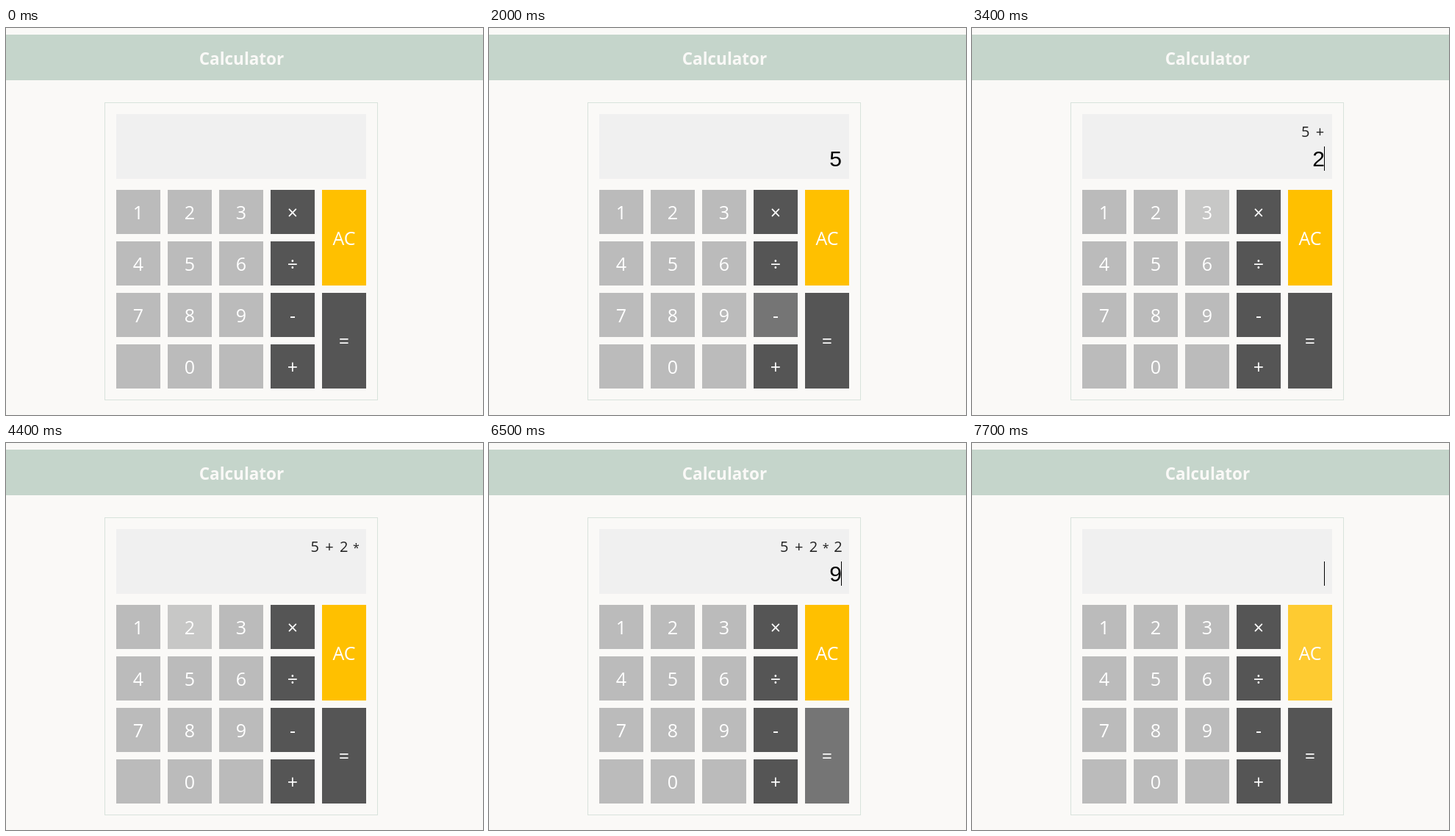
Recreate the animation shown at these times as an HTML page. Size 649x526 px, loop 8000 ms.

```html
<!DOCTYPE html>
<html lang="en">
<head>
<meta charset="utf-8">
<title>Calculator</title>
<style>
  html, body { margin: 0; width: 100%; height: 100%; overflow: hidden; background: #faf9f7; }
  svg { display: block; }
  text { font-family: "Open Sans", "Noto Sans", sans-serif; white-space: pre; }
  .title { font-size: 22.5px; font-weight: 700; fill: #faf9f7; text-anchor: middle; }
  .key text { font-size: 25px; fill: #fff; text-anchor: middle; }
  .expr text { font-size: 20px; fill: #222; text-anchor: middle; }
  .entry { font-family: "Liberation Sans", Arial, sans-serif; font-size: 30px; fill: #000; text-anchor: end; }
</style>
</head>
<body>
<svg width="649" height="526" viewBox="0 0 649 526">
  <rect width="649" height="526" fill="#faf9f7"/>
  <rect y="9" width="649" height="62" fill="#c5d5cb"/>
  <text class="title" x="320.5" y="50">Calculator</text>
  <rect x="134.5" y="101.5" width="371" height="404" fill="none" stroke="#d8e3dc"/>
  <rect x="150" y="117" width="340" height="88" fill="#f0f0f0"/>
  <g class="expr" id="expr"></g>
  <text class="entry" id="entry" x="480" y="188"></text>
  <rect id="caret" x="479" y="161" width="1" height="33"/>
  <g id="pad"></g>
</svg>
<script>
const LOOP = 8000;
const $ = id => document.getElementById(id);

function add(parent, tag, attrs, text = '') {
  const el = document.createElementNS('http://www.w3.org/2000/svg', tag);
  for (const name in attrs) el.setAttribute(name, attrs[name]);
  el.textContent = text;
  return parent.appendChild(el);
}

const keys = {};
function addKey(label, col, row, fill, rows = 1) {
  const x = 150 + col * 70, y = 220 + row * 70, h = rows * 70 - 10;
  const g = add($('pad'), 'g', { class: 'key' });
  add(g, 'rect', { x, y, width: 60, height: h, fill });
  add(g, 'text', { x: x + 30, y: y + h / 2 + 10 }, label);
  if (label) keys[label] = g;
}

['123×', '456÷', '789-', ' 0 +'].forEach((line, row) =>
  [...line].forEach((label, col) =>
    addKey(label.trim(), col, row, col < 3 ? '#bbb' : '#555')));
addKey('AC', 4, 0, '#ffc000', 2);
addKey('=', 4, 2, '#555', 2);

// Each step changes some of: hovered key, expression, entry, caret.
const steps = [
  [0, { hover: '', expr: '', entry: '', caret: 0 }],
  [700, { hover: '5' }],
  [1200, { entry: '5', caret: 1 }],
  [1400, { hover: '6' }],
  [1500, { hover: '9' }],
  [1600, { hover: '-' }],
  [1700, { caret: 0 }],
  [1900, { hover: '' }],
  [2000, { hover: '-' }],
  [2100, { hover: '+' }],
  [2200, { caret: 1 }],
  [2300, { caret: 0 }],
  [2400, { expr: '5 +', entry: '', caret: 1 }],
  [2600, { hover: '9' }],
  [2800, { hover: '5' }],
  [2900, { hover: '2', caret: 0 }],
  [3300, { entry: '2', caret: 1 }],
  [3400, { hover: '3' }],
  [3500, { hover: '×' }],
  [3700, { caret: 0 }],
  [3900, { expr: '5 + 2 *', entry: '', caret: 1 }],
  [4100, { hover: '3' }],
  [4200, { hover: '2' }],
  [4400, { caret: 0 }],
  [4700, { entry: '2', caret: 1 }],
  [4900, { hover: '5' }],
  [5000, { hover: '6' }],
  [5100, { hover: '' }],
  [5200, { hover: '-', caret: 0 }],
  [5300, { hover: '=' }],
  [5500, { expr: '5 + 2 * 2', entry: '9', caret: 1 }],
  [6000, { caret: 0 }],
  [6500, { caret: 1 }],
  [7000, { hover: 'AC', caret: 0 }],
  [7500, { caret: 1 }],
  [7600, { caret: 0 }],
  [7700, { expr: '', entry: '', caret: 1 }]
];

// Sets the expression from the right edge leftwards.
function drawExpr(expr) {
  $('expr').textContent = '';
  const advance = { '+': 14, '*': 8 };
  let right = 480.5;
  for (const token of expr.split(' ').reverse()) {
    const w = advance[token] || 11;
    const el = add($('expr'), 'text', { x: right - w / 2, y: 148 }, token);
    if (token === '*') el.style.fontSize = '16px';
    right -= w + 7.3;
  }
}

function show(state) {
  for (const label in keys)
    keys[label].setAttribute('opacity', label === state.hover ? 0.8 : 1);
  drawExpr(state.expr);
  $('entry').textContent = state.entry;
  $('caret').setAttribute('opacity', state.caret);
}

let shown = -1;
const start = performance.now();
function frame() {
  const t = (performance.now() - start) % LOOP;
  const count = steps.filter(([at]) => at <= t).length;
  if (count !== shown) {
    shown = count;
    show(Object.assign({}, ...steps.slice(0, count).map(step => step[1])));
  }
  requestAnimationFrame(frame);
}
frame();
</script>
</body>
</html>
```
